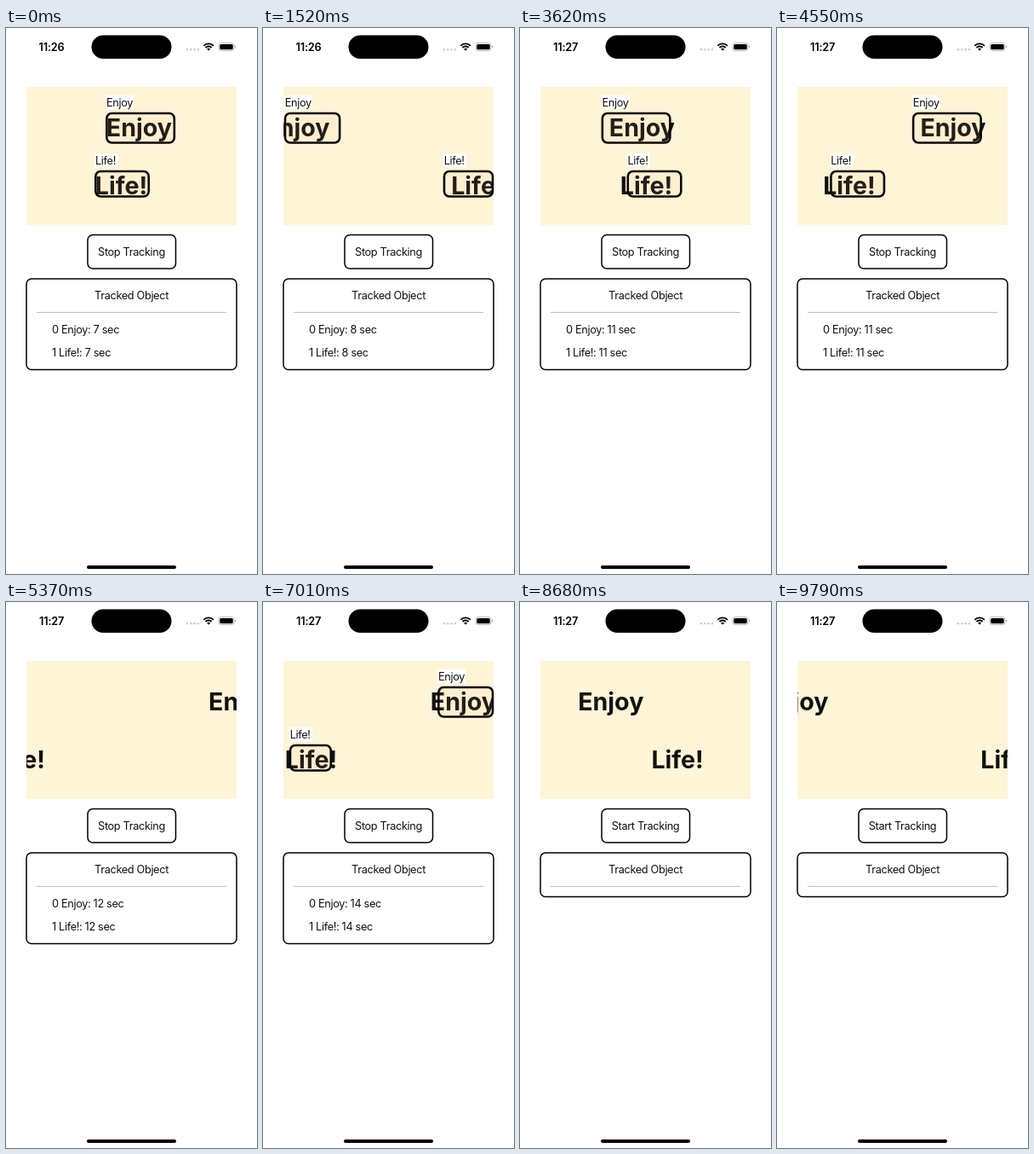
An HTML page for the animation above (9.84 s loop, 295 by 640 pixels).

```html
<!DOCTYPE html>
<html lang="en">
<head>
<meta charset="utf-8">
<title>Text tracking</title>
<style>
  html, body { margin: 0; width: 100%; height: 100%; overflow: hidden; background: #fff; }
  svg { display: block; width: 295px; height: 640px; }
  text { font: 400 12.75px Inter, "Liberation Sans", sans-serif; letter-spacing: -.35px; fill: #111; }
  .mid { text-anchor: middle; }
  .clock { font-weight: 600; letter-spacing: -.2px; fill: #000; }
  .word { font-size: 28.6px; font-weight: 700; letter-spacing: 0; }
  .frame { fill: none; stroke: #000; stroke-width: 1.5; }
  .mark { fill: rgba(255, 160, 120, .08); stroke: #0a0a0a; stroke-width: 2.6; }
  .tag { fill: #fff; }
</style>
</head>
<body>
<svg viewBox="0 0 295 640">
  <defs>
    <clipPath id="view"><rect x="24" y="69" width="247" height="162"/></clipPath>
  </defs>

  <!-- status bar -->
  <text id="clock" class="mid clock" x="53.6" y="26.6">11:26</text>
  <rect x="100.5" y="8.5" width="94" height="27.5" rx="13.75"/>
  <g fill="#c9c9c9">
    <circle cx="213" cy="25.2" r="1.2"/><circle cx="217.3" cy="25.2" r="1.2"/>
    <circle cx="221.6" cy="25.2" r="1.2"/><circle cx="225.9" cy="25.2" r="1.2"/>
  </g>
  <g fill="none" stroke="#000" stroke-width="1.8">
    <path d="M232.3 20.8A8.2 8.2 0 0 1 243.9 20.8"/>
    <path d="M234.5 23A5.1 5.1 0 0 1 241.7 23"/>
  </g>
  <path d="M238.1 26.7L236.1 24.6A2.9 2.9 0 0 1 240.1 24.6Z"/>
  <rect x="250" y="17.6" width="18" height="9" rx="2.8" fill="none" stroke="#a8a8a8" stroke-width=".8"/>
  <rect x="251.3" y="18.9" width="15.4" height="6.4" rx="1.6"/>
  <path d="M269 20.6a1.6 1.6 0 0 1 0 3z" fill="#a8a8a8"/>

  <!-- camera view -->
  <rect x="24" y="69" width="247" height="162" fill="#fef5d7"/>
  <g id="words" clip-path="url(#view)"></g>
  <g id="marks"></g>

  <!-- controls -->
  <rect class="frame" x="96" y="242.5" width="103.5" height="39.5" rx="6"/>
  <text id="button" class="mid" x="147.5" y="267.3">Stop Tracking</text>
  <rect id="panel" class="frame" x="24" y="294" width="247" height="106.5" rx="6"/>
  <text class="mid" x="147.5" y="318.4">Tracked Object</text>
  <path d="M36 333.4H259" stroke="#aaa" stroke-width=".8"/>
  <g id="rows"></g>

  <rect x="95" y="630" width="105" height="4" rx="2"/>
</svg>
<script>
const LOOP = 9840, SWEEP = 4020, TURN = 1900, STOP = 8680;
const EDGE = 270;

// Runs of screen refreshes: first time, last time, count.
const runs = [
  [0, 0, 1], [200, 920, 7], [1060, 1970, 9], [2100, 2230, 2], [2490, 2830, 4],
  [2970, 3850, 9], [3990, 3990, 1], [4230, 5140, 9], [5250, 5820, 6],
  [6190, 7130, 9], [7240, 8170, 9], [8270, 8790, 6], [8980, 9320, 4], [9560, 9790, 3]
];
const ticks = runs.flatMap(([a, b, n]) =>
  Array.from({ length: n }, (_, i) => n > 1 ? a + (b - a) * i / (n - 1) : a));

// x runs from "from" to "to"; a mark shows while x lies between low and high.
const items = [
  { name: 'Enjoy', from: -26, to: 283, base: 126.5, top: 100, width: 79.5, height: 34.5,
    tagY: 79, tagWidth: 33, left: 26, low: 2, high: 222, rowY: 358 },
  { name: 'Life!', from: 253, to: -56, base: 194.6, top: 168, width: 62.5, height: 29.5,
    tagY: 147, tagWidth: 27, left: 32, low: 5, high: 228, rowY: 385 }
];

const $ = id => document.getElementById(id);

function add(parent, tag, attrs, text = '') {
  const el = document.createElementNS('http://www.w3.org/2000/svg', tag);
  set(el, attrs);
  el.textContent = text;
  return parent.appendChild(el);
}

function set(el, attrs) {
  for (const key in attrs) el.setAttribute(key, attrs[key]);
}

for (const it of items) {
  it.word = add($('words'), 'text', { class: 'word', y: it.base }, it.name);
  it.group = add($('marks'), 'g', {});
  it.mark = add(it.group, 'rect', { class: 'mark', y: it.top, height: it.height, rx: 6 });
  it.tag = add(it.group, 'rect', { class: 'tag', y: it.tagY, width: it.tagWidth, height: 16 });
  it.label = add(it.group, 'text', { y: it.tagY + 12.6 }, it.name);
  it.row = add($('rows'), 'text', { x: 54, y: it.rowY });
}

function place(it, t) {
  const p = (t - TURN + 2 * SWEEP) % (2 * SWEEP) / SWEEP;
  return it.from + (it.to - it.from) * (1 - Math.abs(p - 1));
}

function draw(t) {
  let i = ticks.length - 1;
  while (i > 0 && ticks[i] > t + 12) i--;
  const now = ticks[i];
  const seen = i ? Math.max(ticks[i - 1], now - 120) : 0; // marks trail the words
  const on = now < STOP;
  const secs = 8 + Math.floor((now - 560) / 1000);

  items.forEach((it, n) => {
    it.word.setAttribute('x', place(it, now) - 2.2);
    const x = place(it, seen);
    const shown = on && x > it.low && x < it.high;
    it.group.setAttribute('visibility', shown ? 'visible' : 'hidden');
    const left = Math.max(it.left, x - 1.7);
    const right = Math.min(EDGE, x - 1.7 + it.width);
    set(it.mark, { x: left, width: Math.max(0, right - left) });
    it.tag.setAttribute('x', left - 1);
    it.label.setAttribute('x', left - .3);
    it.row.textContent = `${n} ${it.name}: ${secs} sec`;
  });

  $('rows').setAttribute('visibility', on ? 'visible' : 'hidden');
  $('panel').setAttribute('height', on ? 106.5 : 51.5);
  $('button').textContent = on ? 'Stop Tracking' : 'Start Tracking';
  $('clock').textContent = now < 2590 ? '11:26' : '11:27';
}

const start = performance.now();
function loop() {
  draw((performance.now() - start) % LOOP);
  requestAnimationFrame(loop);
}
loop();
</script>
</body>
</html>
```
